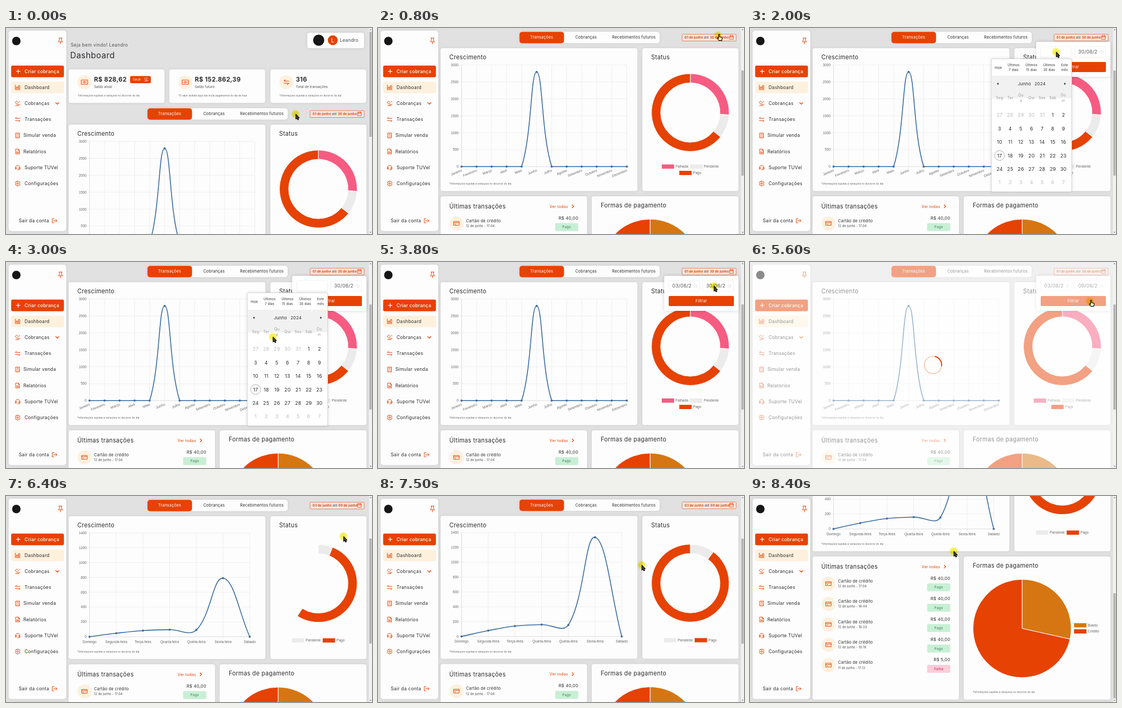
An HTML page with a canvas for the animation above (8900 ms loop, 690 px wide and 388 px high).

```html
<!DOCTYPE html>
<html lang="pt-BR">
<head>
<meta charset="utf-8">
<title>Dashboard</title>
<style>
html, body { margin: 0; width: 100%; height: 100%; overflow: hidden; background: #e1e1e2; }
canvas { display: block; width: 690px; height: 388px; }
</style>
</head>
<body>
<canvas id="stage"></canvas>
<script>
const canvas = document.getElementById('stage');
const c = canvas.getContext('2d');
const dpr = window.devicePixelRatio || 1;
canvas.width = 690 * dpr;
canvas.height = 388 * dpr;

const LOOP = 8900, STEP = 100, LOADED = 6300;
const ORANGE = '#e64204', CREAM = '#fdf1de', INK = '#2b2b2e', CARD = '#fdfdfd';
const PINK = '#f65c82', SILVER = '#ebebeb', AMBER = '#d67612';
const NOTE = '*Informações sujeitas a variações no decorrer do dia';

const ICONS = {
  bars: 'M-4.5-4.5V4H4.5M-2-1H0V2H-2ZM2-3.5H4V2H2Z',
  coin: 'M-1.5-4.5L1.5-1.5L-1.5 1.5L-4.5-1.5ZM-4 4H1L4.5 1.5M0 2.5H2.5M2.5-4.5L4.5-2.5',
  swap: 'M4.5-2H-4.5L-2-4.5M-4.5 2H4.5L2 4.5',
  calc: 'M-3.5-4.5H3.5V4.5H-3.5ZM-1.7-2.3H1.7M-1.7.3H-1M1 .3H1.7M-1.7 2.5H-1M1 2.5H1.7',
  report: 'M-3.5-4.5H1L3.5-2V4.5H-3.5ZM1-4.5V-2H3.5M-1.5 2.7V0M0 2.7V1.2M1.5 2.7V.4',
  headset: 'M-4 0A4 4 0 0 1 4 0M-4 0H-2.4V3H-4ZM4 0H2.4V3H4ZM4 3Q3 4.8 0 4.5',
  gear: 'M-1-4.5H1L1.5-3.2L3.4-3.5L4.4-1.7L3.3 0L4.4 1.7L3.4 3.5L1.5 3.2L1 4.5H-1L-1.5 3.2L-3.4 3.5L-4.4 1.7L-3.3 0L-4.4-1.7L-3.4-3.5L-1.5-3.2ZM1.5 0A1.5 1.5 0 1 1-1.5 0A1.5 1.5 0 1 1 1.5 0',
  exit: 'M-1-4H-4.5V4H-1M-2 0H4.5L2-2.5M4.5 0L2 2.5',
  pin: 'M-3-5H3M-2-5V-1L-4 2H4L2-1V-5M0 2V6',
  cash: 'M-6-4H6V4H-6ZM1.7 0A1.7 1.7 0 1 1-1.7 0A1.7 1.7 0 1 1 1.7 0M-4 0H-3.6M3.6 0H4',
  card: 'M-5-3.6H5V3.6H-5ZM-5-1.2H5M-3 1.4H-1.5',
  date: 'M-3.5-3H3.5V4H-3.5ZM-3.5-.7H3.5M-1.7-4V-2M1.7-4V-2',
  clock: 'M3 0A3 3 0 1 1-3 0A3 3 0 1 1 3 0M0-1.5V0H1.2',
  down: 'M-3-1.5L0 1.5L3-1.5',
  right: 'M-1.5-2.7L1.3 0L-1.5 2.7',
  plus: 'M-3.5 0H3.5M0-3.5V3.5'
};
const ARROW = new Path2D('M0 0V9L2.1 7.2L3.7 10.4L5.2 9.7L3.7 6.7H6.4Z');
const HAND = new Path2D('M0 0Q1-1.2 2 0V4L6 5.2Q7 5.5 6.8 7L6 11H.6L-2.2 7Q-2 5.2 0 7Z');
for (const name in ICONS) ICONS[name] = new Path2D(ICONS[name]);

const clamp = u => Math.min(1, Math.max(0, u));
const smooth = u => u * u * (3 - 2 * u);
const between = (t, a, b) => t >= a && t < b;

function text(str, x, y, size, color = INK, align = 'left', weight = 400) {
  c.font = `${weight} ${size}px Inter, sans-serif`;
  c.letterSpacing = size * 0.03 + 'px';
  c.textAlign = align;
  c.fillStyle = color;
  c.fillText(str, x, y);
  return c.measureText(str).width;
}
const title = (str, x, y) => text(str, x, y, 11.1);
const note = (str, x, y) => text(str, x, y, 4.4, '#555');

function label(str, x, y, align = 'left') {
  c.font = '6.6px "Liberation Sans", Arial, sans-serif';
  c.letterSpacing = '0px';
  c.textAlign = align;
  c.fillStyle = '#666';
  c.fillText(str, x, y);
}

function box(x, y, w, h, r, fill, stroke, shadow) {
  c.save();
  c.beginPath();
  c.roundRect(x, y, w, h, r);
  if (shadow) { c.shadowColor = `rgba(0,0,0,${shadow})`; c.shadowBlur = 6 * dpr; }
  c.fillStyle = fill;
  c.fill();
  c.shadowColor = 'transparent';
  if (stroke) { c.strokeStyle = stroke; c.lineWidth = 0.8; c.stroke(); }
  c.restore();
}
const panel = (x, y, w, h) => box(x, y, w, h, 4, CARD, null, 0.08);

function disc(x, y, r, fill) {
  c.beginPath();
  c.arc(x, y, r, 0, 7);
  c.fillStyle = fill;
  c.fill();
}

function line(x1, y1, x2, y2, color) {
  c.beginPath();
  c.moveTo(x1, y1);
  c.lineTo(x2, y2);
  c.strokeStyle = color;
  c.lineWidth = 0.6;
  c.stroke();
}

function icon(name, x, y, color = ORANGE, scale = 1, width = 1) {
  c.save();
  c.translate(x, y);
  c.scale(scale, scale);
  c.strokeStyle = color;
  c.lineWidth = width;
  c.lineCap = c.lineJoin = 'round';
  c.stroke(ICONS[name]);
  c.restore();
}

function legend(str, x, y, color) {
  box(x, y - 4, 23.3, 8, 0, color);
  label(str, x + 26, y + 2.3);
}

// slices: [end angle in degrees, colour], clockwise from the top
function ring(x, y, outer, inner, slices, grow = 1) {
  let from = 0;
  for (const [end, color] of slices) {
    const a = (from * grow - 90) * Math.PI / 180, b = (end * grow - 90) * Math.PI / 180;
    c.beginPath();
    c.arc(x, y, outer, a, b);
    c.arc(x, y, inner, b, a, true);
    c.closePath();
    c.fillStyle = color;
    c.fill();
    c.strokeStyle = '#fff';
    c.lineWidth = 1;
    c.stroke();
    from = end;
  }
}

function lineChart({ names, values, right, top, bottom, max, step, tilted }, grow) {
  const left = 157.5, gap = (right - left) / (names.length - 1);
  for (let v = 0; v <= max; v += step) {
    const y = bottom - v / max * (bottom - top);
    line(left - 4, y, right, y, v ? '#e4e4e4' : '#c4c4c4');
    label(v, left - 5.5, y + 2.3, 'right');
  }
  names.forEach((name, i) => {
    const x = left + i * gap;
    line(x, top, x, bottom + 4, i ? '#e4e4e4' : '#c4c4c4');
    if (!tilted) return label(name, x, bottom + 11.5, 'center');
    c.save();
    c.translate(x + 0.5, bottom + 7);
    c.rotate(-0.38);
    label(name, 0, 2, 'right');
    c.restore();
  });

  // Cardinal spline with tension 0.4, handles limited to the plot area
  const pts = values.map((v, i) => [left + i * gap, bottom - v / max * (bottom - top) * grow]);
  const inside = y => Math.min(bottom, Math.max(top, y));
  const handles = pts.map((p, i) => {
    const a = pts[i - 1] || p, b = pts[i + 1] || p;
    const da = Math.hypot(p[0] - a[0], p[1] - a[1]), db = Math.hypot(b[0] - p[0], b[1] - p[1]);
    const ka = 0.4 * da / (da + db), kb = 0.4 * db / (da + db), dx = b[0] - a[0], dy = b[1] - a[1];
    return [p[0] - ka * dx, inside(p[1] - ka * dy), p[0] + kb * dx, inside(p[1] + kb * dy)];
  });
  c.beginPath();
  c.moveTo(...pts[0]);
  for (let i = 1; i < pts.length; i++)
    c.bezierCurveTo(handles[i - 1][2], handles[i - 1][3], handles[i][0], handles[i][1], ...pts[i]);
  c.strokeStyle = '#34689f';
  c.lineWidth = 1.6;
  c.stroke();
  for (const [x, y] of pts) disc(x, y, 2, '#3f6ca0');
}

const YEAR = {
  names: 'Janeiro Fevereiro Março Abril Maio Junho Julho Agosto Setembro Outubro Novembro Dezembro'.split(' '),
  values: [0, 0, 0, 0, 0, 2795, 0, 0, 0, 0, 0, 0],
  right: 469, top: 69.7, bottom: 261, max: 3000, step: 500, tilted: true
};
const WEEK = {
  names: ['Domingo', 'Segunda-feira', 'Terça-feira', 'Quarta-feira', 'Quinta-feira', 'Sexta-feira', 'Sábado'],
  values: [0, 79, 140, 160, 154, 1338, 0],
  right: 459.5, top: 69.5, bottom: 265, max: 1400, step: 200
};

function header() {
  text('Seja bem vindo! Leandro', 122, -109.5, 8.7, '#555');
  text('Dashboard', 121, -87.5, 15.5);
  box(568, -135, 107, 29, 4, CARD, null, 0.1);
  disc(589.5, -121, 10.5, '#161616');
  disc(616, -121, 9.3, ORANGE);
  text('L', 616, -117, 11, '#fff', 'center');
  text('Leandro', 629.5, -118, 8.5, '#444');

  const stats = [
    [118, 'cash', 'R$ 828,62', 'Saldo atual', NOTE],
    [308, 'cash', 'R$ 152.862,39', 'Saldo futuro', '*O valor exibido aqui não inclui pagamentos do dia de hoje'],
    [498.5, 'swap', '316', 'Total de transações', NOTE]
  ];
  for (const [x, sign, value, caption, remark] of stats) {
    panel(x, -66, 180.5, 63);
    disc(x + 30, -42, 13.3, CREAM);
    icon(sign, x + 30, -42, ORANGE, 1, 1.1);
    text(value, x + 48, -43, 11.6, INK, 'left', 700);
    text(caption, x + 48, -31.5, 6.1, '#444');
    note(remark, x + 17, -14.8);
  }
  box(234, -53.5, 39, 13.5, 2.5, ORANGE);
  text('Sacar', 239, -45, 5.5, '#fff');
  icon('coin', 264.5, -47, '#fff', 0.75);
}

function filters(from, to) {
  box(267, 7, 264, 21.5, 5, CARD, null, 0.08);
  box(266.7, 7.2, 84, 21.5, 5, ORANGE);
  text('Transações', 308.5, 20.3, 7.5, '#fff', 'center');
  text('Cobranças', 392.2, 20.3, 7.5, INK, 'center');
  text('Recebimentos futuros', 482.3, 20.3, 7.5, INK, 'center');
  box(573.2, 11.7, 102, 12.8, 1.5, '#f1e8e3', '#e2673a');
  let x = 578;
  x += text(from + ' de junho', x, 20, 5.9, ORANGE, 'left', 700);
  x += text(' até ', x, 20, 5.9, '#444');
  text(to + ' de junho', x, 20, 5.9, ORANGE, 'left', 700);
  icon('date', 666.5, 17.5, ORANGE, 0.95, 0.9);
}

function transactions() {
  panel(118, 317, 276, 269.5);
  title('Últimas transações', 134.5, 340);
  text('Ver todas', 323.5, 338.8, 7.3, ORANGE);
  icon('right', 367.5, 336, ORANGE, 1, 1.2);
  const rows = ['12 de junho - 17:04', '12 de junho - 16:44', '12 de junho - 16:33', '12 de junho - 10:18', '11 de junho - 17:12'];
  rows.forEach((when, i) => {
    const y = 368 + i * 38.4, failed = i === 4;
    disc(148, y, 13.3, CREAM);
    icon('card', 148, y);
    text('Cartão de crédito', 166, y - 2.3, 7.5);
    text(when, 166, y + 7, 5.7, '#444');
    text(failed ? 'R$ 5,00' : 'R$ 40,00', 377.5, y - 7.3, 8.1, INK, 'right');
    box(334, y - 0.5, 43.5, 15, 2, failed ? '#fbcdda' : '#c8efd5');
    text(failed ? 'Falha' : 'Pago', 355.7, y + 9.3, 6.4, failed ? '#c2264e' : '#3f7f58', 'center');
  });
}

function payments() {
  panel(403, 317, 276.5, 269.5);
  title('Formas de pagamento', 420, 338);
  ring(513, 452.5, 92.5, 0, [[102.5, AMBER], [360, ORANGE]]);
  legend('Boleto', 611, 446.5, AMBER);
  legend('Crédito', 611, 458, ORANGE);
  note(NOTE, 420, 573.5);
}

function page(t) {
  const updated = t >= LOADED;
  const grow = updated ? 1 - (1 - clamp((t - LOADED + 100) / 1000)) ** 4 : 1;
  header();
  filters(updated ? '03' : '01', updated ? '09' : '30');
  panel(118, 38, 371, 269);
  title('Crescimento', 134.5, 59);
  lineChart(updated ? WEEK : YEAR, grow);
  note(NOTE, 134.5, 295);
  panel(498.5, 38, 181, 269);
  title('Status', 515, 59);
  if (updated) {
    ring(588.8, 164.6, 73.2, 56, [[36.5, SILVER], [360, ORANGE]], grow);
    legend('Pendente', 539, 272, SILVER);
    legend('Pago', 597, 272, ORANGE);
  } else {
    ring(588.8, 159.2, 73.2, 56, [[93.5, PINK], [129, SILVER], [360, ORANGE]]);
    legend('Falhada', 535, 261, PINK);
    legend('Pendente', 588.3, 261, SILVER);
    legend('Pago', 568, 273, ORANGE);
  }
  transactions();
  payments();
}

function sidebar() {
  box(5, 5, 108.5, 377.5, 5, CARD, null, 0.08);
  disc(19.5, 24.5, 8, '#161616');
  icon('pin', 102.7, 24);
  box(9.7, 70.7, 99.5, 22, 3, ORANGE);
  icon('plus', 23, 81.7, '#fff', 1, 1.2);
  text('Criar cobrança', 35, 84.7, 8.7, '#fff', 'left', 500);
  box(9.7, 100.7, 99.5, 22, 3, CREAM);
  const items = [['bars', 'Dashboard'], ['coin', 'Cobranças'], ['swap', 'Transações'], ['calc', 'Simular venda'],
    ['report', 'Relatórios'], ['headset', 'Suporte TUVel'], ['gear', 'Configurações']];
  items.forEach(([sign, name], i) => {
    const y = 112 + i * 30.15;
    icon(sign, 22, y);
    text(name, i === 3 || i === 4 ? 32.7 : 35, y + 3, 8.7);
  });
  icon('down', 96.7, 142, ORANGE, 1, 1.2);
  text('Sair da conta', 24, 366, 8.7);
  icon('exit', 91.7, 363);
}

function popup(from, to) {
  box(539.5, 26, 140, 66, 3, '#fff', null, 0.18);
  [[548, from], [612, to]].forEach(([x, value]) => {
    box(x, 35, 58.5, 20, 2, '#fff', '#ececec');
    text(value, x + 6.7, 48.3, 9, '#555');
    if (value) icon('clock', x + 50.5, 45, '#dcdcdc', 1, 0.7);
  });
  box(548, 64, 123, 19, 2, ORANGE);
  text('Filtrar', 609.5, 76, 7.4, '#fff', 'center');
}

function calendar(x, presets, marked) {
  const y = presets ? 91 : 58;
  box(x, 58, 151.5, presets ? 250.5 : 218, 2, '#fff', '#cacaca', 0.14);
  if (presets) {
    box(x + 0.5, 90, 150.5, 42.5, 0, '#f1f1f1');
    text('Hoje', x + 13, 77, 6, INK, 'center');
    [['Últimos', '7 dias', 42], ['Últimos', '15 dias', 75.5], ['Últimos', '30 dias', 109], ['Este', 'mês', 138]]
      .forEach(([a, b, dx]) => {
        text(a, x + dx, 72, 6, INK, 'center');
        text(b, x + dx, 81.3, 6, INK, 'center');
      });
  } else box(x + 0.5, 58.5, 150.5, 52, 0, '#fafafa');
  for (const [tip, back] of [[10.5, 13.5], [140.5, 137.5]]) {
    c.beginPath();
    c.moveTo(x + tip, y + 14);
    c.lineTo(x + back, y + 11.8);
    c.lineTo(x + back, y + 16.2);
    c.fillStyle = '#222';
    c.fill();
  }
  text('Junho', x + 50, y + 17, 8);
  text('2024', x + 81.5, y + 17, 8);
  const column = i => x + 15.6 + i * 20.05;
  ['Seg', 'Ter', 'Qu/a', 'Qui', 'Sex', 'Sáb', 'Do/m'].forEach((day, i) => {
    const [a, b] = day.split('/');
    text(a, column(i), y + (b ? 37.8 : 43), 7, '#999', 'center');
    if (b) text(b, column(i), y + 47.8, 7, '#999', 'center');
  });
  for (let i = 0; i < 42; i++) {
    const day = i - 4, cx = column(i % 7), cy = y + 73 + Math.floor(i / 7) * 25.4;
    const inMonth = day > 0 && day < 31, filled = inMonth && marked.includes(day);
    if (filled) disc(cx, cy, 9.3, '#526872');
    if (day === 17) box(cx - 9.3, cy - 9.3, 18.6, 18.6, 9.3, '#fff', '#999');
    const number = day < 1 ? day + 31 : day > 30 ? day - 30 : day;
    text(number, cx, cy + 3.4, 9.2, filled ? '#fff' : inMonth ? INK : '#bbb', 'center');
  }
}

function loader(t) {
  c.fillStyle = 'rgba(255,255,255,.5)';
  c.fillRect(0, 0, 690, 388);
  const start = -1.35 + (t - 5600) / 1000 * 2 * Math.PI;
  for (const [sweep, color] of [[2 * Math.PI, '#f7cfbb'], [1.5, ORANGE]]) {
    c.beginPath();
    c.arc(345, 194, 16.3, start, start + sweep);
    c.strokeStyle = color;
    c.lineWidth = 2;
    c.stroke();
  }
}

function scrollbar(scroll) {
  box(684.5, 0, 5.5, 388, 0, '#f1f1f1');
  box(685, 7 + scroll * 0.507, 4.5, 198, 0, '#b5b5b5');
  c.fillStyle = '#666';
  for (const [y, d] of [[4, -2], [384, 2]]) {
    c.beginPath();
    c.moveTo(685.8, y);
    c.lineTo(688.8, y);
    c.lineTo(687.3, y + d);
    c.fill();
  }
}

// time, x, y of the pointer
const PATH = [
  [0, 546, 162], [300, 546, 162], [800, 641, 14], [1200, 641, 14], [1700, 577, 45], [2100, 577, 45],
  [2600, 512, 120], [3000, 503, 141], [3200, 470, 188], [3300, 470, 188], [3700, 632, 45], [4000, 636, 46],
  [4600, 648, 157], [4800, 652, 156], [5300, 641, 74], [6300, 641, 74], [7200, 497, 130], [7500, 497, 130],
  [8200, 385, 105], [8300, 385, 105], [8400, 384, 104], [LOOP, 384, 104]
];

function pointer(t) {
  const i = PATH.findIndex(p => p[0] > t);
  const [t0, x0, y0] = PATH[i - 1], [t1, x1, y1] = PATH[i];
  const u = smooth((t - t0) / (t1 - t0)), x = x0 + (x1 - x0) * u, y = y0 + (y1 - y0) * u;
  const hand = between(t, 700, 1300) || between(t, 3100, 3400) || between(t, 4200, 6400);
  const shape = hand ? HAND : ARROW;
  c.save();
  c.translate(x + (hand ? 1 : 0.5), y + (hand ? -1.5 : 0.5));
  c.lineWidth = 1.3;
  c.lineJoin = 'round';
  c.strokeStyle = '#141414';
  c.fillStyle = hand ? '#fff' : '#555';
  c.fill(shape);
  c.stroke(shape);
  c.restore();

  // Soft highlight that tints whatever lies below
  const glow = c.createRadialGradient(x, y, 5, x, y, 8.8);
  glow.addColorStop(0, '#f8f04a');
  glow.addColorStop(1, 'rgba(248,240,74,0)');
  c.save();
  c.globalCompositeOperation = 'multiply';
  disc(x, y, 8.8, glow);
  c.restore();
}

function draw(t) {
  const scroll = 144 * smooth(clamp(t / 500)) + 203 * smooth(clamp((t - 7480) / 720));
  c.setTransform(dpr, 0, 0, dpr, 0, 0);
  c.fillStyle = '#e1e1e2';
  c.fillRect(0, 0, 690, 388);
  c.save();
  c.translate(0, 144 - scroll);
  page(t);
  c.restore();
  sidebar();
  if (between(t, 1200, LOADED)) {
    const picking = between(t, 2000, 3300);
    popup(picking ? '' : t < 2000 ? '01/06/2' : '03/06/2', t < 4800 ? '30/06/2' : '09/06/2');
    if (picking) calendar(455, true, t < 3200 ? [] : [3]);
    if (between(t, 3900, 4800)) calendar(519, false, t < 4500 ? [30] : [9, 30]);
  }
  if (between(t, 5600, LOADED)) loader(t);
  scrollbar(scroll);
  pointer(t);
}

function tick() {
  const t = performance.now() % LOOP;
  draw(Math.floor(t / STEP) * STEP);
  requestAnimationFrame(tick);
}
tick();
</script>
</body>
</html>
```
